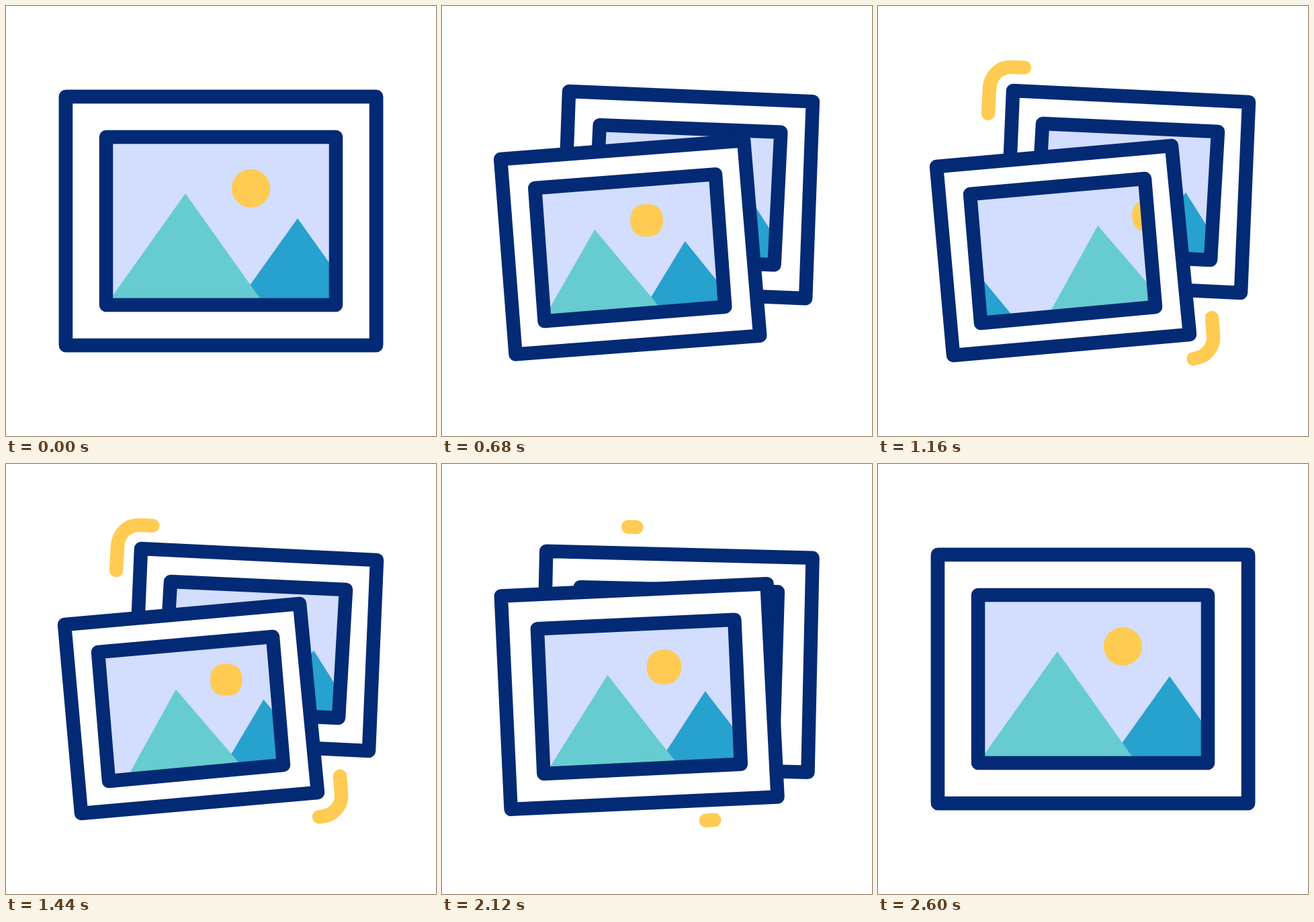
Animation of 640 by 640 pixels, one loop 2800 ms. Source, as an HTML page with a canvas:

```html
<!DOCTYPE html>
<html lang="en">
<head>
<meta charset="utf-8">
<title>Photos</title>
<style>
  html, body { margin: 0; width: 100%; height: 100%; overflow: hidden; background: #fff; }
  canvas { display: block; width: 640px; height: 640px; }
</style>
</head>
<body>
<canvas id="stage" width="640" height="640"></canvas>
<script>
const ctx = document.getElementById('stage').getContext('2d');
const LOOP = 2800;
const NAVY = '#032a75', SKY = '#d3ddfe', TEAL = '#66ccd1', BLUE = '#27a1ce', YELLOW = '#ffcb52';
const SUN_HANDLE = 15.7;
const SCROLL = [-324, 38.5];

// Each picture morphs point by point from the shared resting layout.
const rest = {
  outer: [[89, 135], [551, 135], [551, 505], [89, 505]],
  inner: [[149, 195], [491, 195], [491, 445], [149, 445]],
  near: [[267, 279], [385, 445], [149, 445]],
  far: [[434, 316], [526, 445], [342, 445]],
  sun: [[364.5, 271.5]]
};
const back = {
  outer: [[201, 126], [552, 143], [540, 427], [189, 410]],
  inner: [[245, 175], [506, 187], [495, 378], [234, 366]],
  near: [[331, 243], [414, 374], [234, 366]],
  far: [[458, 277.5], [522, 379], [381, 373]],
  sun: [[406, 241]]
};
const front = {
  outer: [[87, 239], [437, 208], [464, 489], [112, 520]],
  inner: [[137, 280], [397, 257], [413, 448], [153, 472]],
  near: [[232, 338], [333, 455.6], [158.5, 471]],
  far: [[362.5, 353], [439.6, 446.7], [299.6, 459.2]],
  sun: [[307, 323.5]]
};
const arcs = [
  { path: new Path2D('M164 160L166 122C167 104 181 90 199 91L290 94'),
    length: 179, hold: 0.6, headPower: 4, tailPower: 3.7 },
  { path: new Path2D('M497 464L499 490C501 508 488 523 469 525L390 531'),
    length: 154, hold: 0.5, headPower: 2.3, tailPower: 4.4 }
];

const lerp = (a, b, k) => a + (b - a) * k;
const progress = (t, from, to) => Math.min(1, Math.max(0, (t - from) / (to - from)));

// cubic-bezier(x1, 0, x2, 1)
function ease(x, x1, x2) {
  let lo = 0, hi = 1;
  for (let i = 0; i < 30; i++) {
    const s = (lo + hi) / 2, r = 1 - s;
    if (3 * x1 * s * r * r + 3 * x2 * s * s * r + s * s * s < x) lo = s; else hi = s;
  }
  return lo * lo * (3 - 2 * lo);
}

function polygon(points) {
  ctx.beginPath();
  points.forEach(([x, y]) => ctx.lineTo(x, y));
  ctx.closePath();
}

function fill(points, color) {
  polygon(points);
  ctx.fillStyle = color;
  ctx.fill();
}

function outline(points) {
  polygon(points);
  ctx.strokeStyle = NAVY;
  ctx.stroke();
}

function drawSun([x, y], r) {
  const h = SUN_HANDLE;
  ctx.beginPath();
  ctx.moveTo(x, y - r);
  ctx.bezierCurveTo(x + h, y - r, x + r, y - h, x + r, y);
  ctx.bezierCurveTo(x + r, y + h, x + h, y + r, x, y + r);
  ctx.bezierCurveTo(x - h, y + r, x - r, y + h, x - r, y);
  ctx.bezierCurveTo(x - r, y - h, x - h, y - r, x, y - r);
  ctx.fillStyle = YELLOW;
  ctx.fill();
}

function drawPicture(pose, spread, slide) {
  const at = part => rest[part].map(([x, y], i) =>
    [lerp(x, pose[part][i][0], spread), lerp(y, pose[part][i][1], spread)]);
  const inner = at('inner');
  fill(at('outer'), '#fff');
  outline(at('outer'));
  fill(inner, SKY);
  ctx.save();
  polygon(inner);
  ctx.clip();
  // While scrolling, a second copy of the scene follows the first.
  for (const offset of slide > 0 ? [slide, slide - 1] : [0]) {
    ctx.save();
    ctx.translate(SCROLL[0] * offset, SCROLL[1] * offset);
    fill(at('far'), BLUE);
    fill(at('near'), TEAL);
    drawSun(at('sun')[0], lerp(28.5, 23.8, spread));
    ctx.restore();
  }
  ctx.restore();
  outline(inner);
}

function drawArc({ path, length, hold, headPower, tailPower }, t) {
  const grow = 1 - (1 - progress(t, 720, 1200)) ** 3;
  const head = hold * grow + (1 - hold) * progress(t, 1200, 2120) ** headPower;
  const tail = progress(t, 1160, 2140) ** tailPower;
  if (head <= tail) return;
  ctx.save();
  ctx.lineCap = 'round';
  ctx.strokeStyle = YELLOW;
  ctx.setLineDash([length * (head - tail), 2000]);
  ctx.lineDashOffset = -length * tail;
  ctx.stroke(path);
  ctx.restore();
}

function draw(t) {
  const spread = ease(progress(t, 200, 960), 0.595, 0.175)
               - ease(progress(t, 1800, 2600), 0.6, 0.21);
  const slide = t < 1840 ? ease(progress(t, 480, 1840), 0.6, 0.2) : 0;
  ctx.clearRect(0, 0, 640, 640);
  ctx.lineWidth = 20.5;
  ctx.lineJoin = 'round';
  drawPicture(back, spread, 0);
  drawPicture(front, spread, t > 480 ? slide : 0);
  arcs.forEach(arc => drawArc(arc, t));
}

function tick() {
  draw(performance.now() % LOOP);
  requestAnimationFrame(tick);
}
tick();
</script>
</body>
</html>
```
